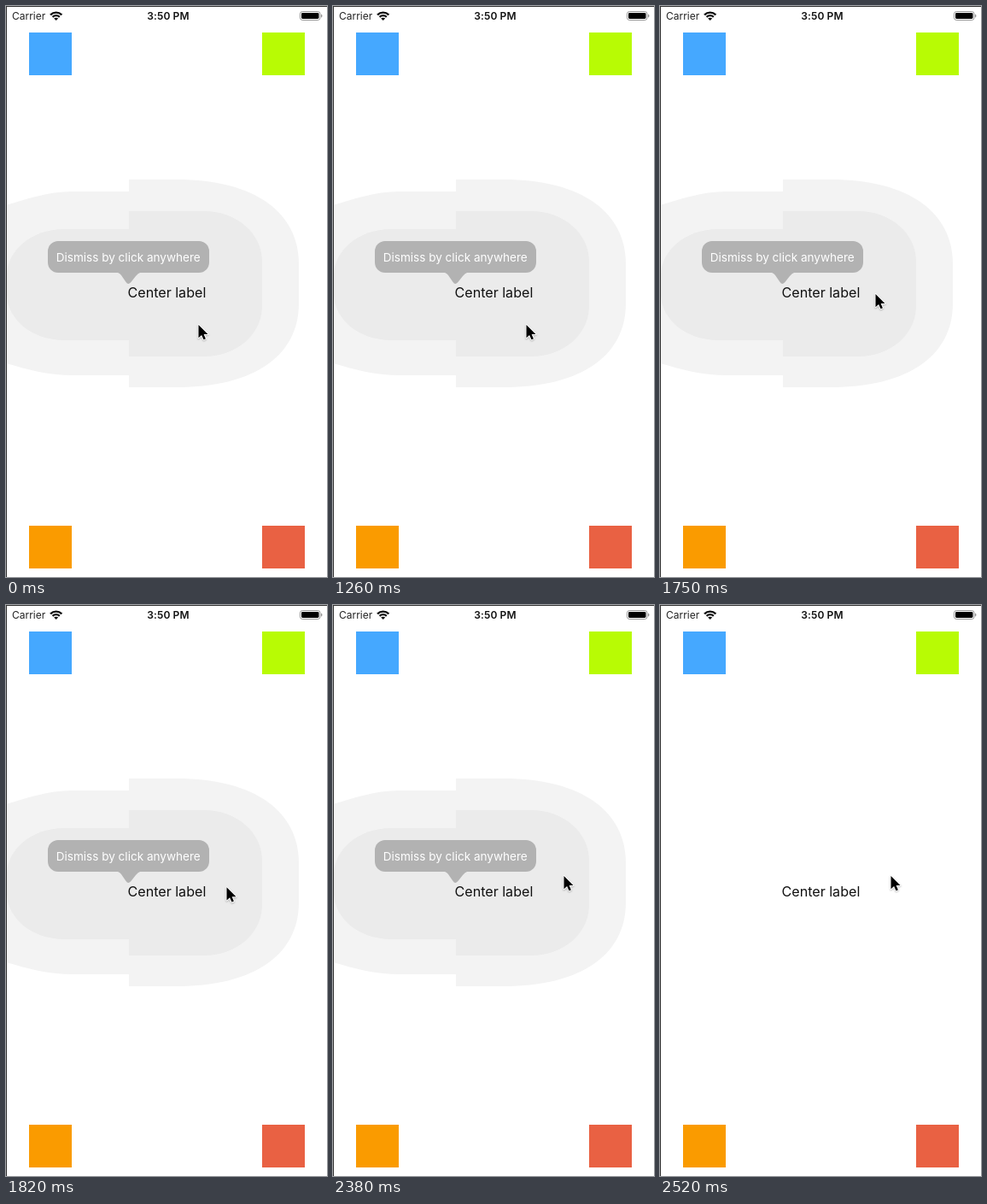
An HTML page with a canvas that plays this animation: 376x668 px, repeating every 3640 ms.

```html
<!DOCTYPE html>
<html lang="en">
<head>
<meta charset="utf-8">
<title>Tooltip dismiss</title>
<style>
html, body { margin: 0; width: 100%; height: 100%; overflow: hidden; background: #fff; }
canvas { display: block; width: 376px; height: 668px; }
</style>
</head>
<body>
<canvas id="stage"></canvas>
<script>
const W = 376, H = 668, LOOP = 3640, STEP = 70, HIDE_AT = 2520;
const canvas = document.getElementById('stage');
const ratio = window.devicePixelRatio || 1;
canvas.width = W * ratio;
canvas.height = H * ratio;
const ctx = canvas.getContext('2d');

const SQUARES = [
  [27, 31, '#45a8ff'],
  [300, 31, '#b8fb04'],
  [27, 608, '#fa9b00'],
  [300, 608, '#e96143']
];

// Pointer tip: time, x, y
const PATH = [[1190, 225.5, 373], [1260, 226.5, 373], [1750, 252.5, 337], [1960, 270.5, 317]];

function fillPath(d, color) {
  ctx.fillStyle = color;
  ctx.fill(new Path2D(d));
}

function roundBox(x, y, w, h, r) {
  ctx.beginPath();
  ctx.roundRect(x, y, w, h, r);
}

function label(text, x, y, size, color, weight = 400, spacing = 0) {
  ctx.font = `${weight} ${size}px Inter, sans-serif`;
  ctx.letterSpacing = spacing + 'px';
  ctx.fillStyle = color;
  ctx.fillText(text, x, y);
}

function drawWifi(x, y) {
  ctx.save();
  ctx.beginPath();
  ctx.moveTo(x, y);
  ctx.lineTo(x - 13, y - 13);
  ctx.lineTo(x + 13, y - 13);
  ctx.clip();
  ctx.strokeStyle = '#111';
  ctx.lineWidth = 2.2;
  for (const r of [5.8, 9.4]) {
    ctx.beginPath();
    ctx.arc(x, y, r, 0, Math.PI * 2);
    ctx.stroke();
  }
  ctx.beginPath();
  ctx.arc(x, y, 3.3, 0, Math.PI * 2);
  ctx.fillStyle = '#111';
  ctx.fill();
  ctx.restore();
}

function drawBattery() {
  roundBox(344.5, 6.5, 23.5, 10, 2.7);
  ctx.strokeStyle = '#999';
  ctx.lineWidth = 1;
  ctx.stroke();
  roundBox(346, 8, 20.5, 7, 1.4);
  ctx.fillStyle = '#000';
  ctx.fill();
  roundBox(369, 9.7, 1.4, 3.8, [0, 1.4, 1.4, 0]);
  ctx.fillStyle = '#999';
  ctx.fill();
}

function drawStatus() {
  label('Carrier', 7, 15.6, 12, '#222');
  drawWifi(58.7, 17);
  label('3:50 PM', 165.3, 15.6, 12, '#111', 600, 0.1);
  drawBattery();
}

// Soft shadow in two flat bands, split at x = 144
function drawShadow() {
  const outer = '#f3f3f3', inner = '#ebebeb';
  fillPath('M144 217H78C48 217 25 226 0 233V418C25 425 48 432 78 432H144Z', outer);
  fillPath('M144 203H200C292 203 343 242 343 302V348C343 408 292 446 200 446H144Z', outer);
  fillPath('M144 261H68C30 261 1 286 1 315V337C1 366 30 391 68 391H144Z', inner);
  fillPath('M144 240H232C270 240 300 266 300 299V351C300 384 270 410 232 410H144Z', inner);
}

function drawTooltip() {
  const gray = '#b2b2b2';
  roundBox(49, 275, 189, 37, 12);
  ctx.fillStyle = gray;
  ctx.fill();
  fillPath('M129 311.5C132 312 133.5 313 135 315L140.5 323Q143 326.5 146 323.5L152 316Q154.5 312.5 158 311.5Z', gray);
  label('Dismiss by click anywhere', 58.7, 298.6, 13.55, '#fff');
}

function drawPointer(x, y) {
  const arrow = new Path2D('M0 0V15.2L3.6 11.9L6 17.2L8.4 16.2L6.1 11H11Z');
  ctx.save();
  ctx.translate(x, y);
  ctx.lineJoin = 'round';
  ctx.strokeStyle = '#fff';
  ctx.lineWidth = 2;
  ctx.shadowColor = 'rgba(0,0,0,.25)';
  ctx.shadowBlur = 2 * ratio;
  ctx.shadowOffsetY = ratio;
  ctx.stroke(arrow);
  ctx.shadowColor = 'transparent';
  ctx.fillStyle = '#000';
  ctx.fill(arrow);
  ctx.restore();
}

function pointerAt(t) {
  if (t <= PATH[0][0]) return PATH[0].slice(1);
  for (let i = 1; i < PATH.length; i++) {
    const [t0, x0, y0] = PATH[i - 1], [t1, x1, y1] = PATH[i];
    if (t <= t1) {
      const u = Math.pow((t - t0) / (t1 - t0), i === 2 ? 1.15 : 1);
      return [x0 + (x1 - x0) * u, y0 + (y1 - y0) * u];
    }
  }
  return PATH[PATH.length - 1].slice(1);
}

function draw(time) {
  const t = Math.floor((time % LOOP) / STEP) * STEP;
  ctx.setTransform(ratio, 0, 0, ratio, 0, 0);
  ctx.fillStyle = '#fff';
  ctx.fillRect(0, 0, W, H);
  const open = t < HIDE_AT;
  if (open) drawShadow();
  for (const [x, y, color] of SQUARES) {
    ctx.fillStyle = color;
    ctx.fillRect(x, y, 50, 50);
  }
  drawStatus();
  if (open) drawTooltip();
  label('Center label', 142.5, 340.7, 16.1, '#111');
  ctx.fillStyle = '#333';
  ctx.fillRect(0, 0, W, 1);
  ctx.fillRect(0, 0, 1, H);
  drawPointer(...pointerAt(t));
}

const start = performance.now();
function tick() {
  draw(performance.now() - start);
  requestAnimationFrame(tick);
}
tick();
</script>
</body>
</html>
```
